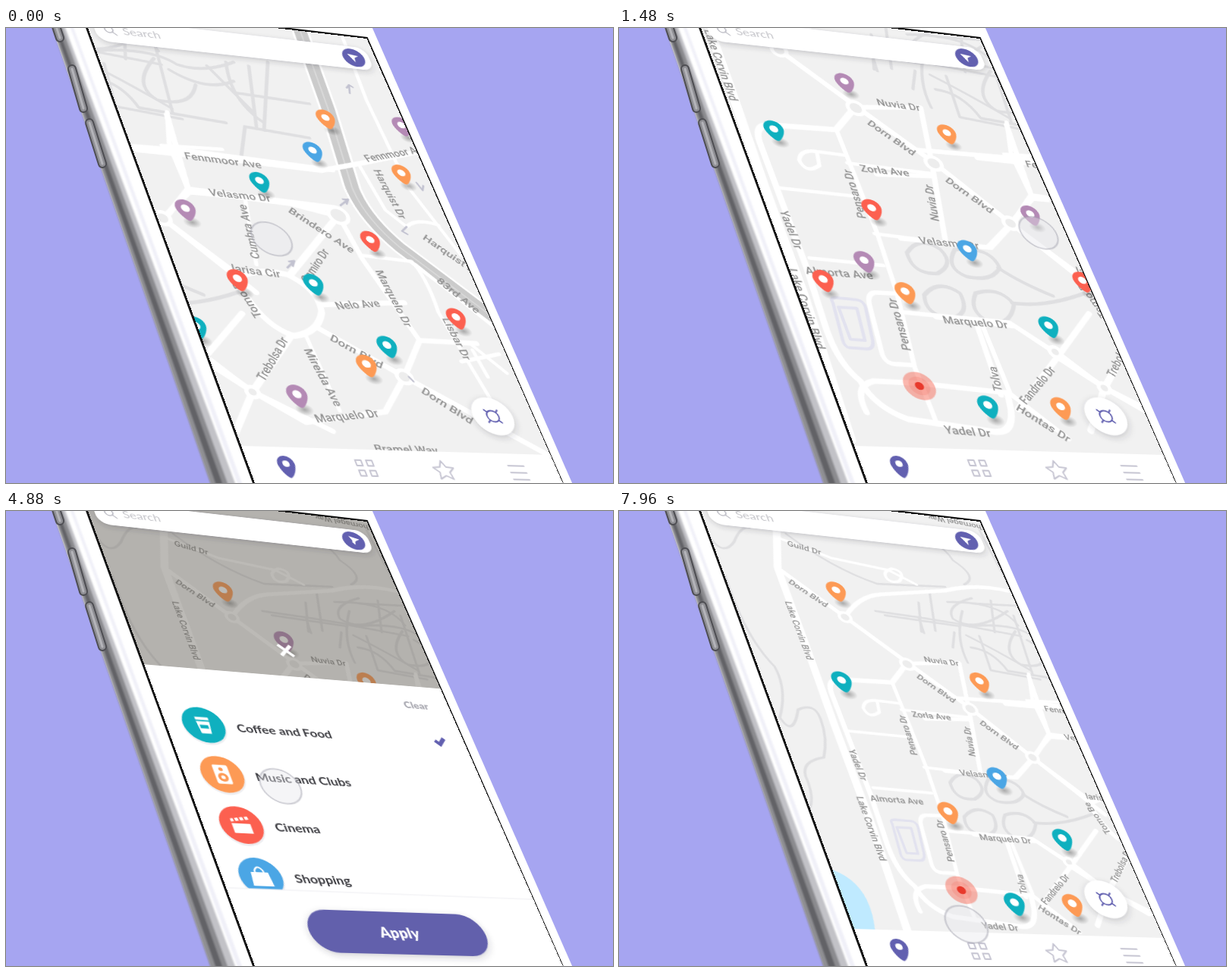
Animation of 800x600 px, one loop 8000 ms. Source, as an HTML page:

```html
<!DOCTYPE html>
<html lang="en">
<head>
<meta charset="utf-8">
<title>City map on a phone</title>
<style>
  html, body { margin: 0; width: 100%; height: 100%; overflow: hidden; background: #a6a5f1; }
  #stage { position: relative; width: 100%; height: 100%; overflow: hidden; contain: strict; }
  svg { position: absolute; left: 0; top: 0; }
  #screen { transform-origin: 0 0; overflow: hidden; }
  #map text { font: 500 14.5px Roboto, sans-serif; fill: #8f8f8f; text-anchor: middle; dominant-baseline: central; }
  #ui text { font-family: Lato, sans-serif; }
  .line { fill: none; stroke-linecap: round; stroke-linejoin: round; }
</style>
</head>
<body>
<div id="stage">
<svg id="phone" width="800" height="600">
  <defs><filter id="soft"><feGaussianBlur stdDeviation="1.3"/></filter></defs>
  <path d="M60-2H482L747 602H271Z" fill="#fff"/>
  <g id="edge" filter="url(#soft)"></g>
  <g id="keys" class="line"></g>
  <path d="M93-33L476.5 12L736 603H326Z" fill="#111"/>
</svg>

<svg id="screen" width="375" height="680">
  <defs>
    <radialGradient id="shade">
      <stop offset="0" stop-color="#000" stop-opacity=".3"/>
      <stop offset="1" stop-color="#000" stop-opacity="0"/>
    </radialGradient>
    <filter id="drop" x="-30%" y="-30%" width="160%" height="180%">
      <feDropShadow dx="0" dy="3" stdDeviation="4" flood-color="#334" flood-opacity=".22"/>
    </filter>
    <clipPath id="list"><path d="M0 316H375V566H0Z"/></clipPath>
  </defs>
  <rect width="375" height="700" fill="#f1f1f1"/>
  <g id="map"></g>
  <g id="ui">
    <g filter="url(#drop)"><circle cx="322" cy="568" r="25.5" fill="#fff"/></g>
    <g class="line" stroke="#6260b0" stroke-width="1.8">
      <circle cx="322" cy="568" r="7.5"/>
      <path d="M316.5 562.5l-3-3M327.5 562.5l3-3M316.5 573.5l-3 3M327.5 573.5l3 3"/>
    </g>
    <rect y="618" width="375" height="82" fill="#fff"/>
    <path d="M44 657C39 655 34 645 34 639a10 10 0 0 1 20 0C54 645 49 655 44 657Z" fill="#6260b0"/>
    <circle cx="44" cy="639" r="4" fill="#fff"/>
    <g class="line" stroke="#c6c5d2" stroke-width="1.8">
      <path d="M127 632h7v7h-7zM140 632h7v7h-7zM127 645h7v7h-7zM140 645h7v7h-7z"/>
      <path d="M231 630l3.8 8 8.7 1-6.4 6 1.7 8.6-7.8-4.3-7.8 4.3 1.7-8.6-6.4-6 8.7-1z"/>
      <path d="M314 634h20M314 643h20M314 652h20"/>
    </g>
    <rect id="dim" width="375" height="700" fill="#57544a"/>
    <g filter="url(#drop)"><rect x="8" y="17" width="358" height="37" rx="15" fill="#fff"/></g>
    <g class="line" stroke="#b9b9c2" stroke-width="1.6"><circle cx="26" cy="34" r="5"/><path d="M30 38l4 4"/></g>
    <text x="43" y="40" font-size="16" fill="#c3c3c8">Search</text>
    <circle cx="344" cy="35.5" r="14.8" fill="#6260b0"/>
    <path id="arrow" d="M337 30L351 32 345 36 344 43Z" fill="#fff"/>
    <path id="funnel" d="M337 30h14l-5 6v6l-4-3v-3z" fill="#fff" transform="rotate(18 344 36)"/>
    <g id="sheet">
      <path d="M0 264H375V710H0Z" fill="#fff"/>
      <path class="line" d="M179 217l16 16M195 217l-16 16" stroke="#fff" stroke-width="4.5" style="stroke-linecap:butt"/>
      <text x="331" y="298" font-size="13.5" font-weight="900" fill="#aaaab2" text-anchor="middle">Clear</text>
      <g clip-path="url(#list)"><g id="rows"></g></g>
      <path d="M0 566H375" stroke="#ededf1"/>
      <g filter="url(#drop)"><rect x="78" y="590" width="215" height="55" rx="27.5" fill="#6260ac"/></g>
      <text x="186" y="624" font-size="18" font-weight="900" fill="#fff" text-anchor="middle">Apply</text>
    </g>
    <circle id="touch" r="24" fill="#e6e6ec" fill-opacity=".4" stroke="#9a9aa6" stroke-opacity=".45" stroke-width="2"/>
  </g>
</svg>
</div>

<script>
const $ = id => document.getElementById(id);
const add = (parent, markup) => parent.insertAdjacentHTML('beforeend', markup);
const LOOP = 8000;

// Projection of the flat phone screen onto the stage.
const [a, b, c, d, e, f, g, h] = [1.086, .2911, 97, .1196, .8447, -30, .0001616, -.0001732];
$('screen').style.transform = `matrix3d(${[a, d, 0, g, b, e, 0, h, 0, 0, 1, 0, c, f, 0, 1]})`;

function flat(x, y) {
  const A = a - g * x, B = b - h * x, C = d - g * y, D = e - h * y;
  const u = x - c, v = y - f, det = A * D - B * C;
  return [(u * D - B * v) / det, (A * v - C * u) / det];
}

// Map views: scale and offset. Map parts are written as stage points seen in one of them.
const VIEW = { east: [1, -299.5, 19], mid: [1, -154, 47], west: [1, 0, 0], wide: [.797, 62, 135] };
function world(view, x, y, lift = 0) {
  const [s, tx, ty] = VIEW[view], [X, Y] = flat(x, y);
  return [(X - tx) / s, (Y + lift - ty) / s];
}
const toWorld = (view, path) =>
  path.replace(/(-?\d+) (-?\d+)/g, (_, x, y) => world(view, +x, +y).map(n => n.toFixed(1)).join(' '));

const map = $('map');
const lines = (view, color, width, path, fill = 'none') =>
  add(map, `<path class="line" d="${toWorld(view, path)}" stroke="${color}" stroke-width="${width}" style="fill:${fill}"/>`);

// Lake, park paths and buildings
lines('wide', '#bfeaff', 1, 'M270 470Q330 485 337 553L300 553Z', '#bfeaff');
const PATH = '#dfdfe1';
lines('wide', PATH, 4, 'M112 22Q135 65 152 40Q160 20 172 22M140 85Q165 165 205 205Q222 235 212 272' +
  'M236 262Q258 252 266 275Q275 300 270 325Q240 330 246 350Q262 385 245 402M212 272Q230 300 236 262');
lines('wide', PATH, 4, 'M338 132L400 141L455 150M395 140L402 161M409 105L417 158M465 115Q430 124 440 142Q470 162 512 132' +
  'M442 160L440 180M450 150L530 165M520 138L545 215M465 122L525 125M475 165L490 210L555 222M490 118L495 160');
lines('wide', PATH, 4, 'M345 22Q420 32 440 65Q475 88 455 97M220 30Q280 75 340 96L430 100M475 25L520 110');
lines('mid', PATH, 5, 'M228 330Q245 305 275 325Q295 345 270 358Q235 360 228 330M295 325Q345 320 357 350Q345 370 310 362Q280 350 295 325' +
  'M250 388Q270 365 300 385Q315 415 285 420Q250 415 250 388M322 385Q355 375 375 400Q370 430 340 425Q310 410 322 385' +
  'M355 350Q385 370 430 388M372 398Q420 405 480 382');
lines('east', PATH, 4.5, 'M112 30Q190 25 225 48Q260 60 300 45M112 65Q150 70 175 105L290 125M195 40Q165 75 200 95Q245 105 250 75' +
  'M215 55Q265 85 300 70M290 45Q295 95 340 125M320 50L330 130M345 45L340 135M265 50L325 110M300 85L400 100M310 170L315 130L400 145');
lines('mid', PATH, 4, 'M190 30L192 78M130 50L260 70M265 45Q250 90 270 130M270 85Q320 110 380 145M240 30Q330 30 360 70');
lines('wide', '#e2e2ef', 4, 'M360 412Q356 407 364 407L385 409Q392 410 394 417L402 452Q404 462 395 461L378 460Q373 459 371 452Z' +
  'M366 417L385 418L394 452L379 451Z');

// Highway
const highway = 'M372 -40L424 105L456 210Q472 250 520 290L660 395';
lines('east', '#fff', 24, highway);
lines('east', '#cbcbcb', 18, highway);
lines('east', '#dadada', 2, highway);

// Streets
const street = (view, width, path) => lines(view, '#fff', width, path);
street('wide', 12, 'M207 -10L209 75L250 187L285 285L330 405L381 556');
street('wide', 8, 'M209 75L298 140L380 200L463 260L545 325L640 400M380 200L360 226L290 222Q274 222 280 240L332 375' +
  'L352 435Q365 475 390 495Q405 522 440 535L530 548Q550 550 547 525L543 507');
street('wide', 7, 'M298 140Q315 112 345 110L430 105Q470 95 515 106M397 528Q382 500 404 495L450 497L545 507L607 555');
street('wide', 5, 'M209 35L280 62L355 78L392 97M354 90Q345 80 360 76Q378 80 370 92Q362 96 354 90' +
  'M372 262L460 272M372 254L340 250Q322 248 322 260Q330 275 343 265L340 250M302 290L382 298M335 365L412 372M402 338L520 352L545 325');
street('wide', 6, 'M360 226L378 270L405 338L426 400L446 480L470 540M430 402L404 401Q395 402 398 414L412 466Q416 478 430 477L445 478' +
  'M435 422L545 432L593 463M515 432L545 505M545 325L568 298L545 250L540 215M568 298L610 302');
street('mid', 7, 'M165 130L255 130L268 208M245 188L400 200L585 224M405 250L375 155M378 288L405 250L590 273M378 288L345 322L220 310' +
  'M268 208L282 310M268 224L190 222M265 418L375 430L435 470L500 515L600 565M322 428L352 525M480 412L435 470L375 545');
street('east', 8, 'M308 328Q330 316 370 325Q412 345 416 375Q412 402 380 406Q345 395 318 355Q305 340 308 328' +
  'M205 250L305 325M410 395L525 460L720 566M375 325L438 247M376 405L325 480L300 540');
street('east', 7, 'M165 160L290 173L415 188L470 178L560 160M212 115L240 212M245 215L438 240M360 228L425 245M415 365L525 362' +
  'M325 480L395 520L500 506L525 460L545 412L470 305L438 247M545 412L620 416M260 430L325 480L255 435');
street('east', 5, 'M205 155L285 160M315 225L330 312M395 405L440 505M470 300L535 308Q555 330 570 375L640 492' +
  'M435 -10L475 95L530 210L600 300M465 180L500 240L528 262M540 312L650 400M610 415L660 455M600 440L650 430M615 425L635 460M528 262Q540 250 570 260');

// Roundabouts
for (const [view, x, y, r] of [['wide', 298, 140, 9], ['wide', 380, 202, 10], ['wide', 463, 261, 10], ['wide', 545, 325, 9],
  ['wide', 593, 463, 7], ['east', 438, 247, 12], ['east', 325, 480, 7], ['east', 525, 460, 9]]) {
  const [X, Y] = world(view, x, y);
  add(map, `<circle cx="${X}" cy="${Y}" r="${r}" fill="#ededed" stroke="#fff" stroke-width="5"/>`);
}
lines('east', '#c2c2d0', 2.5, 'M441 234L451 226L444 226M451 226L449 232M371 316L380 307L373 308M380 307L378 314' +
  'M453 86L452 75L449 79M452 75L457 78M528 262L522 268L529 272M541 204L549 214L550 208M531 460L537 466');

// Street names, each along a line between two stage points
function labels(view, list) {
  for (const [name, x1, y1, x2, y2] of list) {
    const [p, q] = [world(view, x1, y1), world(view, x2, y2)];
    const angle = Math.atan2(q[1] - p[1], q[0] - p[0]) * 180 / Math.PI;
    add(map, `<text transform="translate(${(p[0] + q[0]) / 2} ${(p[1] + q[1]) / 2}) rotate(${angle})">${name}</text>`);
  }
}
labels('east', [
  ['Fennmoor Ave', 238, 169, 334, 181], ['Fennmoor Ave', 468, 174, 558, 158], ['Velasmo Dr', 269, 217, 347, 225],
  ['Brindero Ave', 368, 236, 463, 298], ['Cumbra Ave', 329, 302, 312, 235], ['Nelo Ave', 434, 367, 493, 363],
  ['Marquelo Dr', 491, 320, 530, 393], ['Harquist Dr', 486, 183, 525, 255], ['Harquist Dr', 543, 270, 630, 330],
  ['83rd Ave', 565, 328, 627, 378], ['Lisbar Dr', 575, 375, 612, 445], ['Dorn Blvd', 428, 408, 496, 446]]);
labels('east', [
  ['Dorn Blvd', 548, 477, 615, 520], ['Trebolsa Dr', 335, 465, 368, 408], ['Mirelda Ave', 395, 420, 440, 502],
  ['Marquelo Dr', 406, 516, 492, 508], ['Bramel Way', 482, 555, 573, 558], ['Osmiro Dr', 390, 340, 425, 288],
  ['larisa Cir', 298, 317, 361, 325], ['Tomo Be', 331, 378, 300, 332]]);
labels('mid', [
  ['Nuvia Dr', 194, 123, 254, 131], ['Dorn Blvd', 181, 150, 244, 194], ['Dorn Blvd', 287, 228, 350, 273],
  ['Nuvia Dr', 270, 287, 262, 235], ['Velasmo Dr', 248, 313, 327, 320], ['Marquelo Dr', 274, 422, 366, 429],
  ['Tolva', 349, 520, 342, 486], ['Fandrelo Dr', 380, 538, 428, 485]]);
labels('west', [
  ['Zorla Ave', 316, 185, 384, 192], ['Pensaro Dr', 320, 248, 302, 190], ['Pensaro Dr', 379, 422, 361, 360],
  ['Almorta Ave', 245, 320, 335, 327], ['Yadel Dr', 217, 242, 236, 290], ['Lake Corvin Blvd', 224, 306, 270, 435],
  ['Hontas Dr', 525, 500, 593, 543], ['Yadel Dr', 429, 530, 490, 535]]);
labels('wide', [
  ['Lake Corvin Blvd', 220, 112, 255, 204], ['Guild Dr', 221, 42, 267, 55], ['Dorn Blvd', 226, 93, 273, 124],
  ['Thornagel Way', 484, 23, 408, 8]]);

// Current position and pins
const [homeX, homeY] = world('west', 396, 472);
add(map, `<g fill="#f5533f"><circle id="halo" cx="${homeX}" cy="${homeY}" opacity=".42"/>
  <circle id="halo2" cx="${homeX}" cy="${homeY}" opacity=".16"/>
  <circle id="home" cx="${homeX}" cy="${homeY}" fill="#e8392c"/></g>`);

const COLOR = { food: '#0fb0bf', music: '#fd9a55', cinema: '#fc6050', shop: '#4ba6e5', theatre: '#b48ab5' };
const pins = [];
function addPins(view, kind, ...places) {
  for (const [x, y] of places) {
    add(map, `<g><ellipse cx="2" cy="2" rx="11" ry="8" fill="url(#shade)"/>
      <path d="M0 0C-4 0-12-12-12-18.5A12 12 0 0 1 12-18.5C12-12 4 0 0 0Z" fill="${COLOR[kind]}"/>
      <circle cy="-18" r="5.2" fill="#fff"/></g>`);
    pins.push({ node: map.lastElementChild, at: world(view, x, y, 18), kind });
  }
}
addPins('east', 'theatre', [521, 128]);
addPins('east', 'music', [421, 118], [521, 191], [475, 443]);
addPins('east', 'shop', [404, 161]);
addPins('east', 'food', [334, 201], [405, 336], [502, 418]);
addPins('east', 'cinema', [480, 279], [593, 381], [305, 330]);
addPins('mid', 'theatre', [553, 517]);
addPins('west', 'theatre', [297, 70], [323, 306], [542, 245]);
addPins('west', 'food', [204, 133], [566, 392], [486, 497]);
addPins('west', 'music', [432, 138], [377, 347], [582, 499]);
addPins('west', 'cinema', [333, 237], [269, 331]);
addPins('west', 'shop', [459, 291]);
addPins('wide', 'music', [286, 104]);

// Filter rows
const FIRST_ROW = 345.5, ROW = 68.2;
const rows = [
  ['Coffee and Food', 'food', 0, '<path d="M-8-11H8V-7H-8ZM-8-5H8L6 12H-6Z"/><path d="M-5 0H5V5H-5Z" fill="#0fb0bf"/>'],
  ['Music and Clubs', 'music', 5000, '<rect x="-9" y="-13" width="18" height="26" rx="2"/><g fill="#fd9a55"><circle cy="-7" r="2.5"/><circle cy="4" r="6"/></g><circle cy="4" r="2.5"/>'],
  ['Cinema', 'cinema', LOOP, '<path d="M-11-2H11V11H-11ZM-11-4L-11-8-8-9-7-5ZM-5-5L-6-9-2-10-1-6ZM1-6L0-10 4-11 5-7ZM7-7L6-11 10-12 11-8Z"/>'],
  ['Shopping', 'shop', 6480, '<path d="M-10-6H10L12 12H-12Z"/><path d="M-5-3V-8Q0-17 5-8V-3" fill="none" stroke="#fff" stroke-width="2"/>'],
  ['Theatres', 'theatre', LOOP, '<path d="M-11-8L1-5Q3 8-5 9-13 4-11-8ZM3-7L12-7Q14 6 6 10L2 9Q5 3 3-7Z"/><circle cx="-4" cy="-9" r="4"/><circle cx="7" cy="-8" r="4"/><path d="M-8-2l3 1M-3-1l3 1M-7 4Q-5 2-2 5M6 0h4" stroke="#b48ab5" stroke-width="1.6"/>']
];
rows.forEach(([name, kind, , icon], i) => add($('rows'), `<g transform="translate(0 ${FIRST_ROW + i * ROW})">
  <circle cx="45.5" cy="2" r="26" fill="#778" opacity=".12"/>
  <circle cx="45.5" r="25" fill="${COLOR[kind]}"/><g transform="translate(45.5 0)" fill="#fff">${icon}</g>
  <text x="85" y="6" font-size="16" font-weight="700" fill="#3b3b40">${name}</text>
  <path class="tick" d="M336-1l5 5 8-9" fill="none" stroke="#6260b0" stroke-width="5"/></g>`));
const ticks = document.querySelectorAll('.tick');

// Metal edge: strips between x at the top and x at the bottom of the stage
for (const [x0, x1, u0, u1, color] of [[60, 66, 270, 281, '#8f8f93'], [63, 69, 277, 288, '#626266'], [68, 74, 286, 295, '#8b8b8f'],
  [73, 77, 293, 303, '#c2c2c7'], [84, 88, 306, 312, '#f0f0f8']])
  add($('edge'), `<path d="M${x0}-3H${x1}L${u1} 603H${u0}Z" fill="${color}"/>`);
for (const key of ['M64-8L71 13', 'M87 54L102 106', 'M110 125L127 179'])
  add($('keys'), `<path d="${key}" stroke="#4e4e53" stroke-width="12"/><path d="${key}" stroke="#8f8f94" stroke-width="8"/>
    <path d="${key}" stroke="#b4b4b9" stroke-width="3"/>`);

// Keyframes: time, then values
const CAMERA = [[0, ...VIEW.east], [640, ...VIEW.mid], [1080, ...VIEW.mid], [1480, ...VIEW.west], [2480, ...VIEW.west], [2755, ...VIEW.wide]];
const TOUCH = [[0, 350, 278], [640, 516, 316], [1000, 412, 302], [1080, 412, 302], [1480, 553, 270], [1720, 553, 270],
  [2440, 403, 290], [2720, 403, 290], [3140, 458, 39], [3400, 458, 39], [4300, 362, 363], [5050, 362, 363], [5500, 395, 470],
  [6000, 370, 391], [6650, 370, 391], [7250, 516, 557], [7500, 516, 557], [7960, 458, 545]];
const PRESS = [[0, 1], [640, 1], [760, .7], [960, .7], [1080, 1], [1480, 1], [1600, .7], [2400, .7], [2480, 1], [2768, 1], [2900, .7], [3200, 1], [3400, .7], [4880, 1]];
const OPEN = [[3320, 0], [3800, 1], [7560, 1], [7900, 0]];
const SCROLL = [[5500, 0], [6000, 86]];
const SHRINK = [[7600, 1], [7800, 0]];

function tween(keys, t) {
  const next = keys.findIndex(key => key[0] > t);
  if (next < 0) return keys[keys.length - 1].slice(1);
  if (next === 0) return keys[0].slice(1);
  const from = keys[next - 1], to = keys[next];
  const p = (t - from[0]) / (to[0] - from[0]), k = p * p * (3 - 2 * p);
  return from.slice(1).map((v, i) => v + (to[i + 1] - v) * k);
}

function draw() {
  const t = performance.now() % LOOP;
  const [s, tx, ty] = tween(CAMERA, t);
  map.setAttribute('transform', `translate(${tx} ${ty}) scale(${s})`);

  const [left] = tween(SHRINK, t);
  for (const { node, at, kind } of pins) {
    const size = kind === 'cinema' || kind === 'theatre' ? left : 1;
    node.setAttribute('transform', `translate(${at}) scale(${size / s})`);
  }
  const pulse = Math.sin(t / 1000 * Math.PI * 2);
  $('halo').setAttribute('r', (18.5 + pulse) / s);
  $('halo2').setAttribute('r', (12 + 2 * pulse) / s);
  $('home').setAttribute('r', 5.2 / s);

  const [open] = tween(OPEN, t);
  $('dim').setAttribute('opacity', open * .4);
  $('sheet').setAttribute('transform', `translate(0 ${(1 - open) * 490})`);
  $('arrow').setAttribute('opacity', 1 - open);
  $('funnel').setAttribute('opacity', open);
  $('rows').setAttribute('transform', `translate(0 ${-tween(SCROLL, t)[0]})`);
  ticks.forEach((tick, i) => tick.setAttribute('opacity', t >= rows[i][2] ? 1 : 0));

  const [x, y] = tween(TOUCH, t);
  $('touch').setAttribute('transform', `translate(${flat(x, y)})`);
  $('touch').setAttribute('opacity', tween(PRESS, t)[0]);
  requestAnimationFrame(draw);
}
draw();
</script>
</body>
</html>
```
